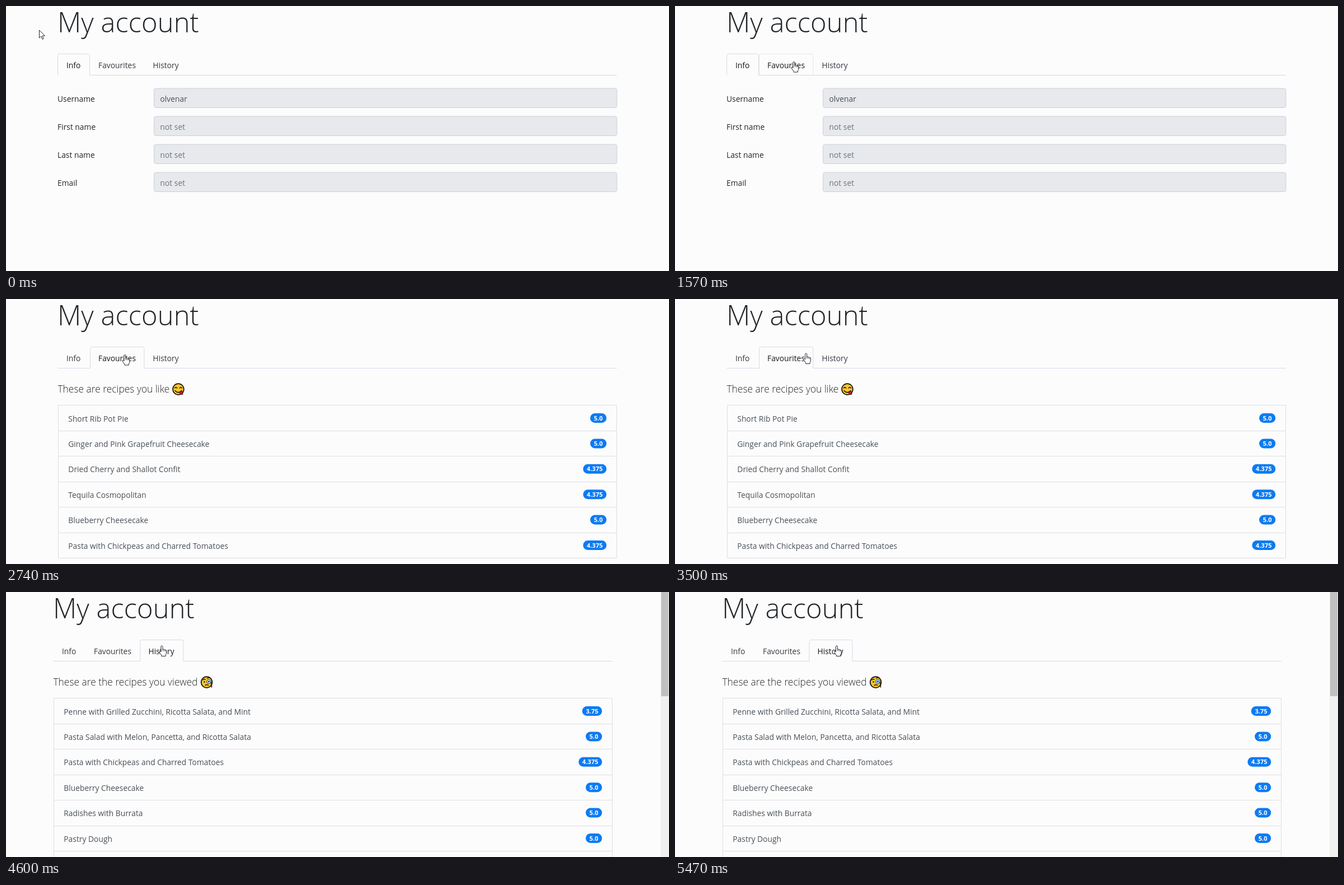
Animation, 1185 px wide and 473 px high, one loop 5500 ms. Source, as an HTML page:

```html
<!DOCTYPE html>
<html lang="en">
<head>
<meta charset="utf-8">
<title>My account</title>
<style>
html, body { margin: 0; width: 100%; height: 100%; overflow: hidden; background: #fcfcfc; }
svg { display: block; }
text { font: 13.83px "Open Sans", "Noto Sans", sans-serif; fill: #212529; white-space: pre; }
.title { font-size: 49px; font-weight: 300; }
.lead { font-size: 17.4px; font-weight: 300; }
.tab { fill: #343a40; }
.on { fill: #16191c; }
.item, .value { fill: #495057; }
.empty { fill: #6c757d; }
.badge { font-size: 11.1px; font-weight: 700; fill: #fff; text-anchor: middle; }
.line { fill: none; stroke: #dddee4; }
.edge { fill: none; stroke: #d8d9e8; }
.soft { fill: none; stroke: #e6e7f0; }
.field { fill: #e7e9ec; stroke: #cbd1da; }
.pointer { fill: #fff; stroke: #22252b; stroke-width: 1; stroke-linejoin: round; }
</style>
</head>
<body>
<svg width="1185" height="473" viewBox="0 0 1185 473">
  <g id="page"></g>
  <g id="cursor" class="pointer"></g>
</svg>
<script>
const LOOP = 5500, OPEN_FAVOURITES = 1640, OPEN_HISTORY = 4300, SHIFT = 8;
const page = document.getElementById('page');
const cursor = document.getElementById('cursor');

const tabs = [
  { name: 'Info', x: 92.5, end: 149.5, label: 108 },
  { name: 'Favourites', x: 150.5, end: 247, label: 165 },
  { name: 'History', x: 248, end: 325, label: 262.5 }
];
const favourites = [
  ['Short Rib Pot Pie', '5.0'],
  ['Ginger and Pink Grapefruit Cheesecake', '5.0'],
  ['Dried Cherry and Shallot Confit', '4.375'],
  ['Tequila Cosmopolitan', '4.375'],
  ['Blueberry Cheesecake', '5.0'],
  ['Pasta with Chickpeas and Charred Tomatoes', '4.375']
];
const viewed = [
  ['Penne with Grilled Zucchini, Ricotta Salata, and Mint', '3.75'],
  ['Pasta Salad with Melon, Pancetta, and Ricotta Salata', '5.0'],
  ['Pasta with Chickpeas and Charred Tomatoes', '4.375'],
  ['Blueberry Cheesecake', '5.0'],
  ['Radishes with Burrata', '5.0'],
  ['Pastry Dough', '5.0']
];

const text = (x, y, s, cls = '') => `<text x="${x}" y="${y}" class="${cls}">${s}</text>`;
const path = (d, cls) => `<path d="${d}" class="${cls}"/>`;

const face = `<circle r="9.9" fill="#fcc72c" stroke="#17150f" stroke-width="1.7"/>`;
const ink = 'fill="none" stroke="#17150f" stroke-width="1.5" stroke-linecap="round"';
const yummy = `<g transform="translate(308 161)">${face}
  <path d="M-6.5-2q2-3 4.2 0M2.3-2q2-3 4.2 0M-6 2.5q6 6.5 12 0" ${ink}/>
  <path d="M1 5.2L6 3Q9.500 7 7.500 9.300Q4.500 10.500 1 5.200Z" fill="#e81224" stroke="#17150f"/></g>`;
const monocle = `<g transform="translate(366.700 161)">${face}
  <path d="M-7-4q2-2.500 4.500-1M1-7q3-2 6 0M-2.500 5.500q3-1.800 5.500 0" ${ink}/>
  <circle cx="-4" cy="-.5" r="1.300" fill="#17150f"/>
  <circle cx="3.800" cy="-1" r="3.700" fill="#b8dff2" stroke="#55616b" stroke-width="1.300"/>
  <circle cx="3.800" cy="-1" r="1.300" fill="#17150f"/>
  <path d="M7.500 0Q9.500 4 8.800 9" ${ink}/></g>`;

function tabBar(open, hover) {
  let out = path('M92.5 123.5H1092', 'edge');
  tabs.forEach((tab, i) => {
    const outline = `M${tab.x} 123.500V88.500q0-3 3-3H${tab.end - 3}q3 0 3 3V123.500`;
    if (i === open) {
      out += `<rect x="${tab.x}" y="122" width="${tab.end - tab.x}" height="3" fill="#fcfcfc"/>`;
      out += path(outline, 'edge');
    } else if (i === hover) out += path(outline, 'soft');
    out += text(tab.label, 111, tab.name, i === open || i === hover ? 'tab on' : 'tab');
  });
  return out;
}

function form() {
  return ['Username', 'First name', 'Last name', 'Email'].map((label, i) => {
    const y = 147 + 50 * i;
    return text(92, y + 23.5, label) +
      `<rect x="264.500" y="${y}" width="827.500" height="34.500" rx="3.700" class="field"/>` +
      text(275.5, y + 23.5, i ? 'not set' : 'olvenar', i ? 'empty' : 'value');
  }).join('');
}

function list(heading, icon, rows, bottom) {
  const lineY = i => Math.round(189.3 + 45.5 * i) + .5;
  let out = text(92.5, 167, heading, 'lead') + icon;
  out += path(`M93.500 ${bottom}V189.500H1091.500V${bottom}`, 'line');
  rows.forEach(([name, score], i) => {
    const y = 212.5 + 45.4 * i;
    const width = 16.5 + 6.34 * (score.length - 1);
    out += path(`M93.500 ${lineY(i + 1)}H1091.500`, 'line') + text(111.3, y + 6, name, 'item') +
      `<rect x="${1073.3 - width}" y="${y - 8.5}" width="${width}" height="17" rx="8.500" fill="#0d7bf2"/>` +
      text(1073.3 - width / 2, y + 4, score, 'badge');
  });
  return out;
}

const panels = [
  form(),
  list('These are recipes you like', yummy, favourites, 462.5),
  list('These are the recipes you viewed', monocle, viewed, 480)
];
const scrollbar = `<rect x="1170" width="15" height="473" fill="#f0f0f0"/>
  <rect x="1171" width="13" height="186" fill="#c0c0c0"/>`;

const arrow = '<path d="M.5.5V14.500L3.800 11.500L6 16.800L8.200 15.900L6 10.700H10.500Z"/>';
const hand = `<path d="M-1.500 11V1.500Q-1.500 0 0 0T1.500 1.500V6.500Q2.800 5.300 4 6.900
  Q5.300 6 6.300 7.500Q8.200 7.100 8.200 9V13Q8.200 15 6.800 16.500V18.500H-.5V17
  L-4.300 11.500Q-4.900 9.700-3.500 9.500Q-2.500 9.600-1.500 11Z"/>
  <path d="M1.500 6.500V9.500M4 7V9.800M6.300 7.500V10" fill="none" stroke-width=".8"/>`;

// Pointer stops: time, x, y
const stops = [
  [60, 59, 42.5], [540, 104, 57], [980, 196, 94], [1160, 212.5, 99.5],
  [3390, 212.5, 99.5], [3500, 234, 97], [3800, 278.5, 96],
  [5200, 278.5, 96], [5470, 289, 96]
];

function pointerAt(t) {
  if (t <= stops[0][0]) return stops[0].slice(1);
  const i = stops.findIndex(s => s[0] > t);
  if (i < 0) return stops[stops.length - 1].slice(1);
  const a = stops[i - 1], b = stops[i];
  const u = (t - a[0]) / (b[0] - a[0]);
  // Ease only where the pointer starts from or comes to rest.
  const starts = [0, 4, 7].includes(i - 1), ends = [3, 6, 8].includes(i);
  const k = starts && ends ? u * u * (3 - 2 * u) : starts ? u ** 1.4 : ends ? 1 - (1 - u) ** 1.6 : u;
  return [a[1] + (b[1] - a[1]) * k, a[2] + (b[2] - a[2]) * k];
}

let shown = '';
function draw(now) {
  const t = now % LOOP;
  const open = t < OPEN_FAVOURITES ? 0 : t < OPEN_HISTORY ? 1 : 2;
  const shift = open === 2 ? SHIFT : 0;
  const [x, y] = pointerAt(t);
  const hover = y > 85 && y < 123
    ? tabs.findIndex(tab => x + shift >= tab.x && x + shift <= tab.end) : -1;
  const state = open + ':' + hover;
  if (state !== shown) {
    shown = state;
    page.innerHTML = `<g transform="translate(${-shift} 0)">` +
      text(92, 47, 'My account', 'title') + tabBar(open, hover) + panels[open] + '</g>' +
      (shift ? scrollbar : '');
    cursor.innerHTML = hover < 0 ? arrow : hand;
  }
  cursor.setAttribute('transform', `translate(${x} ${y})`);
  requestAnimationFrame(draw);
}
requestAnimationFrame(draw);
</script>
</body>
</html>
```
